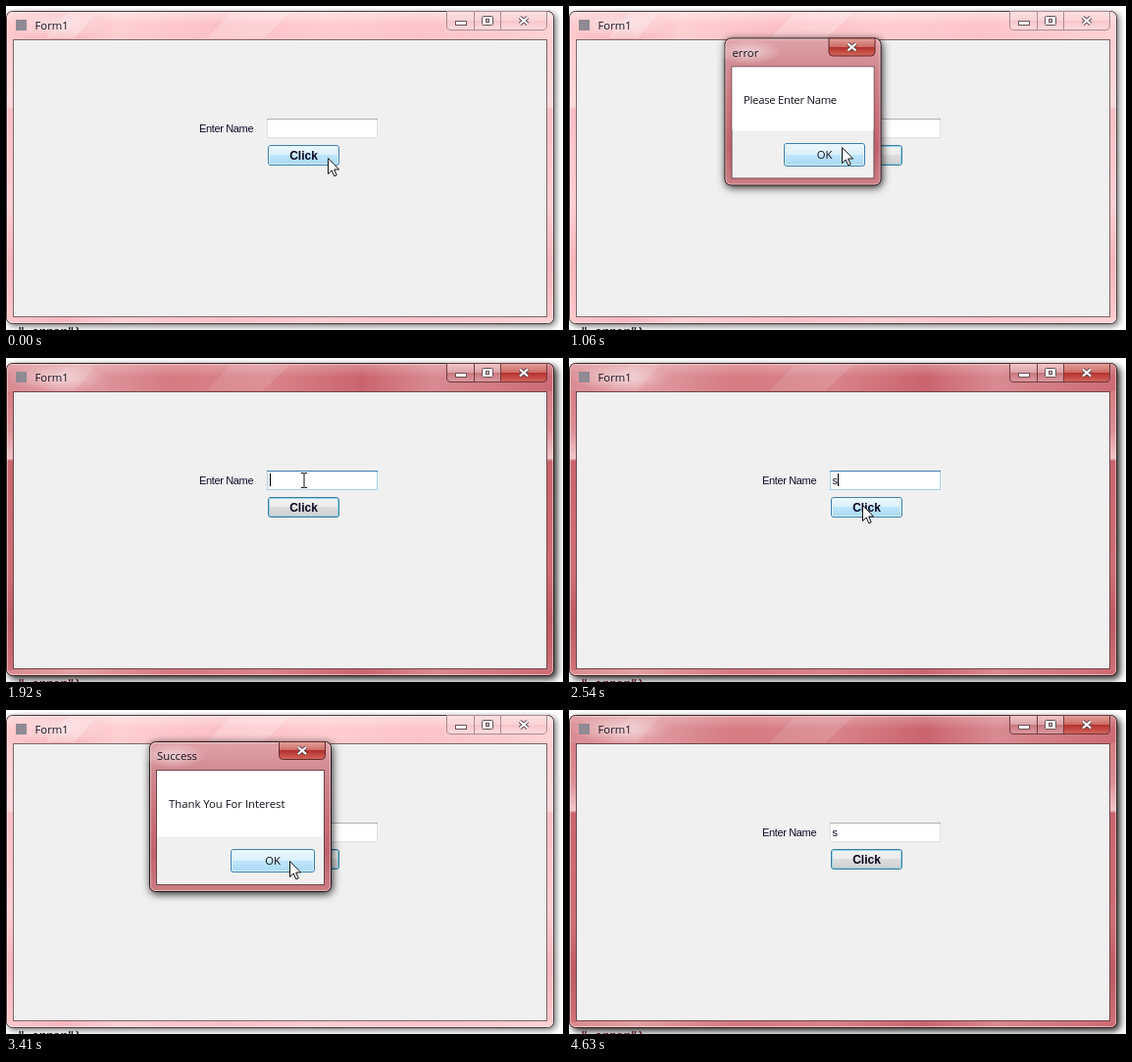
Animation, 568 px wide and 331 px high, one loop 4.82 s. Source, as an HTML page:

```html
<!DOCTYPE html>
<html lang="en">
<head>
<meta charset="utf-8">
<title>Form validation</title>
<style>
  html, body { margin: 0; width: 568px; height: 331px; overflow: hidden; background: #fff; }
  svg { display: block; }
  text { font: 11.3px "Open Sans", "Noto Sans", sans-serif; fill: #14101c; white-space: pre; }
  .label { font: 11px "Liberation Sans", sans-serif; letter-spacing: -.35px; fill: #100828; }
  .bold { font: bold 12px "Liberation Sans", sans-serif; fill: #0a0620; }
  .code { font: bold 12px "Liberation Mono", monospace; }
</style>
</head>
<body>
<svg width="568" height="331" viewBox="0 0 568 331">
  <defs id="defs"></defs>
  <g id="scene"></g>
</svg>
<script>
const LOOP = 4820;

// Each step changes only the listed properties of the one before it.
const steps = [
  [0, { active: 0, button: 'hot', field: '', focus: 0, caret: 0, dialog: '', alpha: 1, ok: 'normal', cursor: 'arrow', at: [328, 155] }],
  [110, { at: [320, 151] }],
  [360, { active: 1, button: 'pressed', at: [311, 147] }],
  [590, { active: 0, button: 'normal', dialog: 'error', alpha: .72, at: [311, 146] }],
  [820, { alpha: 1, at: [291, 148] }],
  [1060, { ok: 'hot', at: [278, 144] }],
  [1280, { active: 1, button: 'hot', alpha: .42 }],
  [1480, { dialog: '', at: [284, 141] }],
  [1700, { button: 'normal', cursor: 'beam', at: [300, 126] }],
  [1920, { focus: 1, caret: 1, at: [304, 125] }],
  [2140, { cursor: '' }],
  [2340, { field: 's' }],
  [2540, { button: 'hot', cursor: 'arrow', at: [299, 150] }],
  [2760, { button: 'pressed', focus: 0, caret: 0 }],
  [2980, { active: 0, button: 'normal', dialog: 'success', alpha: .72, ok: 'normal' }],
  [3190, { alpha: 1, at: [294, 152] }],
  [3410, { ok: 'hot', at: [289, 154] }],
  [4180, { active: 1, alpha: .95, ok: 'pressed' }],
  [4410, { dialog: '', button: 'hot' }],
  [4630, { button: 'normal', cursor: '' }]
];

const dialogs = {
  error: { x: 159, y: 33, w: 159, h: 150, title: 'error', body: 'Please Enter Name', spacing: -.28, textX: 178, okX: 219, okY: 140, okW: 83, split: 127 },
  success: { x: 146.5, y: 32.5, w: 185, h: 153, title: 'Success', body: 'Thank You For Interest', spacing: 0, textX: 166, okX: 229, okY: 142, okW: 86, split: 129 }
};

const gradient = (id, stops, down = true) =>
  `<linearGradient id="${id}" x2="${down ? 0 : 1}" y2="${down ? 1 : 0}">` +
  stops.split(' ').map(s => {
    const [color, offset] = s.split('@');
    return `<stop stop-color="${color}" offset="${offset}%"/>`;
  }).join('') + '</linearGradient>';

const shadow = (id, dx, dy, blur, opacity) =>
  `<filter id="${id}" x="-20%" y="-20%" width="140%" height="140%">
    <feDropShadow dx="${dx}" dy="${dy}" stdDeviation="${blur}" flood-opacity="${opacity}"/></filter>`;

document.getElementById('defs').innerHTML =
  gradient('normal', '#f4f4f4@0 #ebebeb@50 #dddddd@50 #cfcfcf@100') +
  gradient('hot', '#eef8fe@0 #d9f0fc@50 #bee6fd@50 #a7d9f5@100') +
  gradient('pressed', '#e5f4fc@0 #c4e5f6@50 #98d1ef@50 #68b3db@100') +
  gradient('frame1', '#d98a91@0 #e2a0a5@12 #d57a82@30 #d9838a@48 #ca646e@65 #d98a91@78 #cd6a73@100', false) +
  gradient('frame0', '#ffc9cc@0 #f6b6bb@10 #ffcfd2@20 #fbbfc4@40 #ffcdd0@58 #fcc4c8@76 #ffd2d4@100', false) +
  gradient('side1', '#d57d85@0 #dc9097@14 #f0c6c9@24 #c9656f@25 #cf6d76@65 #bd5a64@82 #cf7079@100') +
  gradient('side0', '#ffcdd0@0 #fbdadb@24 #f8bfc4@25 #ffcfd2@60 #f4b4ba@80 #ffc9cc@100') +
  gradient('gloss', '#fff@0 #ffffff00@100') +
  gradient('cap1', '#efc9cc@0 #dda4a9@48 #c9757d@50 #dc9a9f@100') +
  gradient('cap0', '#ffe2e4@0 #fbd2d5@48 #f6c5c9@50 #ffdcde@100') +
  gradient('close1', '#e4a39c@0 #cd6d66@48 #b32f2c@50 #d4675c@100') +
  gradient('dlg', '#e0a4a9@0 #d28b92@18 #cb757e@45 #bf626c@75 #cc7d85@100') +
  '<radialGradient id="glow"><stop stop-color="#fff" stop-opacity=".55"/><stop offset="1" stop-color="#fff" stop-opacity="0"/></radialGradient>' +
  shadow('shadow1', 3, 3, 3.5, .85) + shadow('shadow0', 2, 2, 3, .55) + shadow('shadowDlg', 1, 2, 4.5, .85);

const rect = (x, y, w, h, fill, extra = '') =>
  `<rect x="${x}" y="${y}" width="${w}" height="${h}" fill="${fill}" ${extra}/>`;
const text = (x, y, s, extra = '') => `<text x="${x}" y="${y}" ${extra}>${s}</text>`;
const path = (d, fill, stroke, extra = '') =>
  `<path d="${d}" fill="${fill}" stroke="${stroke}" ${extra}/>`;
const glow = (cx, cy, rx) => `<ellipse cx="${cx}" cy="${cy}" rx="${rx}" ry="13" fill="url(#glow)"/>`;

function button(x, y, w, h, label, mode, cls = '') {
  const edge = { normal: '#3a7d9c', hot: '#3c7fb1', pressed: '#2c628b' }[mode];
  const inner = { normal: '#7fd0ea', hot: '#e6f7ff', pressed: '#8fc4de' }[mode];
  return rect(x + .5, y + .5, w - 1, h - 1, `url(#${mode})`, `rx="2.5" stroke="${edge}"`) +
    rect(x + 1.5, y + 1.5, w - 3, h - 3, 'none', `rx="1.5" stroke="${inner}" stroke-opacity=".8"`) +
    text(x + w / 2, y + h / 2 + 4, label, `text-anchor="middle" class="${cls}"`);
}

function cross(x, y) {
  const d = `M${x - 4} ${y - 3.5}l8 7m0-7l-8 7`;
  return path(d, 'none', '#5c4347', 'stroke-width="4"') + path(d, 'none', '#fff', 'stroke-width="2.2"');
}

function captionButtons(active) {
  const edge = active ? '#6d3a40' : '#b08a8e';
  const glyph = 'stroke-width="1"';
  return path('M449.5 5.5V20Q449.5 24.5 454 24.5H547Q551.5 24.5 551.5 20V5.5Z', `url(#cap${active})`, edge) +
    (active ? path('M504.5 5.5V24.5H547Q551.5 24.5 551.5 20V5.5Z', 'url(#close1)', edge) : '') +
    path('M477.5 6V24M504.5 6V24', 'none', edge) +
    rect(458.5, 15.5, 11, 4, '#fff', `stroke="#6a5054" ${glyph}`) +
    rect(485.5, 10.5, 11, 9, '#fff', `stroke="#6a5054" rx="1" ${glyph}`) +
    rect(489.5, 13.5, 3, 3, '#e4b6ba', `stroke="#6a5054" ${glyph}`) +
    cross(528, 15);
}

function windowFrame(active) {
  const edge = active ? '#3c2023' : '#55373b';
  return rect(.5, 5.5, 558, 319, `url(#frame${active})`, `rx="6" stroke="${edge}" filter="url(#shadow${active})"`) +
    rect(1, 34, 6, 285, `url(#side${active})`) +
    rect(552, 34, 6, 285, `url(#side${active})`) +
    rect(2, 6.5, 555, 13, 'url(#gloss)', `rx="5" opacity="${active ? .25 : .4}"`) +
    path('M40 33L62 7H92L70 33ZM205 33L230 7H290L262 33Z', '#fff', 'none', `opacity="${active ? .1 : .22}"`) +
    rect(1.5, 6.5, 556, 317, 'none', 'rx="5" stroke="#fff" stroke-opacity=".45"') +
    glow(52, 20, 52) +
    rect(10, 14, 11, 11, '#8f8a94') +
    text(29.5, 24, 'Form1') +
    captionButtons(active) +
    rect(7.5, 34.5, 544, 283, '#f0f0f0', `stroke="${active ? '#70454a' : '#80656a'}"`) +
    text(12, 337, '" error")', `class="code" style="fill:${active ? '#5a1822' : '#222'}"`);
}

function form(s) {
  const [top, side] = s.focus ? ['#3d7bad', '#a9d0ea'] : ['#abadb3', '#dfe1e8'];
  return windowFrame(s.active) +
    text(197, 129, 'Enter Name', 'class="label"') +
    rect(266.5, 115.5, 112, 19, '#fff', `stroke="${side}"`) +
    rect(266, 115, 113, 1, top) +
    text(268.5, 129, s.field, 'class="label"') +
    (s.caret ? rect(s.field ? 274 : 269, 118, 1, 13, '#000') : '') +
    button(267, 142, 73, 21, 'Click', s.button, 'bold');
}

function dialog(d, s) {
  const { x, y, w, h } = d;
  const left = x + 7, top = y + 29, inner = w - 14, bottom = y + h - 7;
  // A closing box sinks slightly and narrows.
  const closing = s.active ? (s.alpha < .5 ? 'translate(0 3)' : `translate(${x + w / 2} ${y + h / 2}) scale(.99) translate(${-x - w / 2} ${-y - h / 2})`) : '';
  const right = x + w - 6;
  return `<g opacity="${s.alpha}"><g transform="${closing}">` +
    rect(x, y, w, h, 'url(#dlg)', 'rx="6" stroke="#2c171a" filter="url(#shadowDlg)"') +
    rect(x + 1, y + 1, w - 2, h - 2, 'none', 'rx="5" stroke="#fff" stroke-opacity=".45"') +
    glow(x + 24, y + 14, 34) +
    path(`M${right - 47} ${y}v14q0 4 4 4h39q4 0 4-4v-14Z`, 'url(#close1)', '#632b2e') +
    cross(right - 23.5, y + 9) +
    rect(left, top, inner, bottom - top, '#f0f0f0', 'stroke="#6b484c"') +
    rect(left + .5, top + .5, inner - 1, d.split - top, '#fff') +
    text(x + 7.5, y + 18.5, d.title) + '</g>' +
    text(d.textX, 100, d.body, `letter-spacing="${d.spacing}"`) +
    button(d.okX, d.okY, d.okW, 24, 'OK', s.ok) + '</g>';
}

function pointer(s) {
  const shape = s.cursor === 'arrow'
    ? path('M.5 .5V16.5L4.2 13L6.8 18.8L9.2 17.8L6.7 12H11.6Z', '#fff', '#111')
    : path('M-3-7.5h2.5l.5.5l.5-.5h2.5M0-7v14M-3 7.5h2.5l.5-.5l.5.5h2.5', 'none', '#111');
  return s.cursor && `<g transform="translate(${s.at})">${shape}</g>`;
}

const states = [];
steps.reduce((last, [, change]) => {
  const next = { ...last, ...change };
  states.push(next);
  return next;
}, {});

const scene = document.getElementById('scene');
const start = performance.now();
let shown = -1;

function draw() {
  const time = (performance.now() - start) % LOOP;
  const index = steps.findLastIndex(([from]) => from <= time);
  if (index !== shown) {
    const s = states[index];
    scene.innerHTML = form(s) + (s.dialog && dialog(dialogs[s.dialog], s)) + pointer(s);
    shown = index;
  }
  requestAnimationFrame(draw);
}
draw();
</script>
</body>
</html>
```
